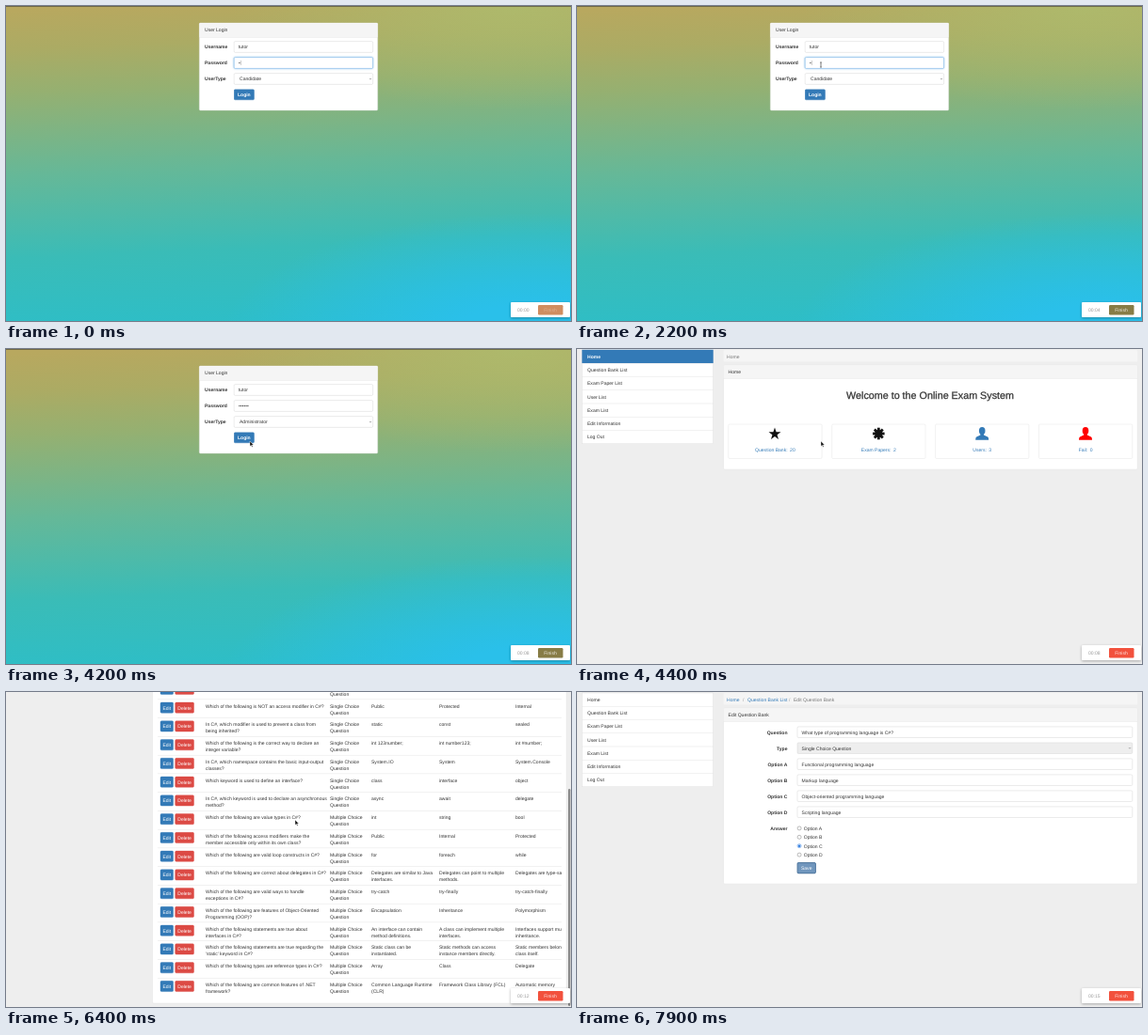
Animation of 600 by 335 pixels, one loop 8000 ms. Source, as an HTML page:

```html
<!DOCTYPE html>
<html lang="en">
<head>
<meta charset="utf-8">
<title>Online Exam System</title>
<style>
html, body { margin: 0; width: 100%; height: 100%; overflow: hidden; background: #eee; }
svg { display: block; width: 600px; height: 335px; }
text { font: 5.05px "Liberation Sans", Arial, sans-serif; fill: #333; text-rendering: geometricPrecision; white-space: pre; }
.b { font-weight: 700; }
.w { fill: #fff; }
.link { fill: #337ab7; }
.soft { fill: #777; }
.hint { fill: #999; }
.mid { text-anchor: middle; }
.end { text-anchor: end; }
.title { font-size: 10.75px; stroke: #333; stroke-width: .25; }
.drop { filter: drop-shadow(0 1px 1.5px rgba(0, 0, 0, .3)); }
.focus { fill: #fff; stroke: #7db8ea; stroke-width: .6; filter: drop-shadow(0 0 .8px rgba(102, 175, 233, .6)); }

.step { animation: 8s step-end infinite; }
#login { animation-name: login; }
#home { animation-name: home; }
#list { animation-name: list; }
#edit { animation-name: edit; }
#pwFocus, #caret { animation-name: pwFocus; }
#menu { animation-name: menu; }
#picked { animation-name: picked; }
#unpicked { animation-name: unpicked; }
#thumb { animation-name: thumb; }
#arrow { animation-name: arrow; }
#beam { animation-name: beam; }
#hand { animation-name: hand; }
#pressed { animation-name: pressed; }
#finish { animation-name: finish; }
#finishText { animation-name: finishText; }
#typed { animation: typed 8s linear infinite; }
#scroll { animation: scroll 8s ease-in-out infinite; }
#mouse { animation: mouse 8s ease-in-out infinite; }

@keyframes login { 0% { opacity: 1 } 53.75%, 100% { opacity: 0 } }
@keyframes home { 0% { opacity: 0 } 53.75% { opacity: 1 } 71.25%, 100% { opacity: 0 } }
@keyframes list { 0% { opacity: 0 } 71.25% { opacity: 1 } 90%, 100% { opacity: 0 } }
@keyframes edit { 0% { opacity: 0 } 90%, 100% { opacity: 1 } }
@keyframes pwFocus { 0% { opacity: 1 } 42.5%, 100% { opacity: 0 } }
@keyframes menu { 0% { opacity: 0 } 42.5% { opacity: 1 } 46.9%, 100% { opacity: 0 } }
@keyframes picked { 0% { opacity: 0 } 46.9%, 100% { opacity: 1 } }
@keyframes unpicked { 0% { opacity: 1 } 46.9%, 100% { opacity: 0 } }
@keyframes thumb { 0% { opacity: 0 } 75.5% { opacity: 1 } 87.5%, 100% { opacity: 0 } }
@keyframes beam { 0% { opacity: 0 } 25% { opacity: 1 } 30%, 100% { opacity: 0 } }
@keyframes arrow { 0% { opacity: 0 } 39% { opacity: 1 } 67.5% { opacity: 0 } 74% { opacity: 1 } 97%, 100% { opacity: 0 } }
@keyframes hand { 0% { opacity: 0 } 67.5% { opacity: 1 } 74%, 100% { opacity: 0 } }
@keyframes pressed { 0% { opacity: 0 } 96.25%, 100% { opacity: 1 } }
@keyframes finish { 0% { fill: #cf8d60 } 5% { fill: #877c46 } 53.75%, 100% { fill: #f2513d } }
@keyframes finishText { 0% { opacity: .3 } 5%, 100% { opacity: .85 } }
@keyframes typed {
  0% { transform: none }
  30% { transform: none; animation-timing-function: steps(5) }
  36.25%, 100% { transform: translateX(9px) }
}
@keyframes scroll {
  0%, 76% { transform: none }
  79.5%, 81.25% { transform: translateY(-148px) }
  85.6%, 100% { transform: none }
}
@keyframes mouse {
  0%, 39% { transform: translate(259px, 62.5px) }
  41.5%, 42.5% { transform: translate(260px, 77px) }
  44.5%, 46.9% { transform: translate(257px, 83px) }
  50.5%, 61% { transform: translate(259px, 98px) }
  68.5%, 73.1% { transform: translate(43px, 26px) }
  76%, 81.25% { transform: translate(307px, 136px) }
  86.5%, 90.6% { transform: translate(170px, 86px) }
  96.25%, 100% { transform: translate(243px, 187px) }
}
</style>
</head>
<body>
<svg viewBox="0 0 600 335">
  <defs>
    <linearGradient id="sky" gradientUnits="userSpaceOnUse" x1="292" y1="-8" x2="308" y2="343">
      <stop offset="0" stop-color="#b8a85f"/>
      <stop offset=".12" stop-color="#abab64"/>
      <stop offset=".25" stop-color="#95b071"/>
      <stop offset=".5" stop-color="#65b898"/>
      <stop offset=".75" stop-color="#3abcb7"/>
      <stop offset="1" stop-color="#2cbec9"/>
    </linearGradient>
    <radialGradient id="cyan" gradientUnits="userSpaceOnUse" cx="0" cy="0" r="1" gradientTransform="translate(560 350) scale(330 130)">
      <stop offset=".25" stop-color="#2ac0ea"/>
      <stop offset="1" stop-color="#2ac0ea" stop-opacity="0"/>
    </radialGradient>
    <radialGradient id="lime" gradientUnits="userSpaceOnUse" cx="0" cy="0" r="1" gradientTransform="translate(540 0) scale(300 110)">
      <stop offset="0" stop-color="#adbd6e" stop-opacity=".8"/>
      <stop offset="1" stop-color="#adbd6e" stop-opacity="0"/>
    </radialGradient>
    <clipPath id="table"><path d="M156 0H590V600H156z"/></clipPath>
  </defs>
  <g id="stage"></g>
  <g class="drop"><rect x="536" y="315" width="63" height="16" rx="1" fill="#fff"/></g>
  <text id="clock" class="hint" x="543" y="325.3">00:00</text>
  <rect id="finish" class="step" x="565" y="318" width="26.5" height="10.5" rx="1.2"/>
  <text id="finishText" class="step w mid" x="578" y="325.1">Finish</text>
  <g id="mouse">
    <path id="arrow" class="step" d="M0 0V5.4L1.3 4.3L2.2 6.3L3.1 5.9L2.2 4H3.9z" fill="#111" stroke="#fff" stroke-width=".4"/>
    <path id="beam" class="step" d="M-1 -2.6Q0 -2.6 0 -2Q0 -2.6 1 -2.6M0 -2V2M-1 2.6Q0 2.6 0 2Q0 2.6 1 2.6" fill="none" stroke="#222" stroke-width=".6"/>
    <path id="hand" class="step" d="M-.6 0Q0 -.7 .5 0V2L2.7 2.5V4.3L2 5.6H-.6L-2 3.4L-1.4 2.9L-.6 3.6z" fill="#fff" stroke="#111" stroke-width=".5"/>
  </g>
</svg>
<script>
const text = (x, y, s, cls = '') => `<text x="${x}" y="${y + 1.8}" class="${cls}">${s}</text>`;
const rect = (x, y, w, h, fill, more = '') => `<rect x="${x}" y="${y}" width="${w}" height="${h}" fill="${fill}" ${more}/>`;
const box = (x, y, w, h, fill = '#fff', line = '#ccc') => rect(x, y, w, h, fill, `rx="1.2" stroke="${line}" stroke-width=".4"`);
const rule = (x, y, w) => rect(x, y, w, .4, '#ddd');
const button = (x, y, w, h, s, fill, cls = 'w') =>
  box(x, y, w, h, fill, cls ? fill : '#ccc') + text(x + w / 2, y + h / 2, s, cls + ' mid');
const chevron = (x, y) => `<path d="M${x - 1} ${y - .5}l1 1l1 -1" fill="none" stroke="#555" stroke-width=".5"/>`;
const scene = (id, body) => `<g id="${id}" class="step">${body}</g>`;
const BLUE = '#337ab7', RED = '#dc4a44';

function loginScene() {
  const dots = Array.from({ length: 6 }, (_, i) => `<circle cx="${247.9 + 1.8 * i}" cy="60.5" r=".65" fill="#444"/>`).join('');
  return ['sky', 'lime', 'cyan'].map(id => rect(0, 0, 600, 335, `url(#${id})`)).join('') +
    rect(0, 0, 600, .8, '#5f5a40') +
    box(205.3, 18, 189.4, 93, '#fff', '#ddd') +
    rect(205.5, 18.2, 189, 14.8, '#f5f5f5') + rule(205.5, 33, 189) + text(211, 25.3, 'User Login') +
    ['Username', 'Password', 'UserType'].map((s, i) => text(211, 43.6 + 17 * i, s, 'b')).join('') +
    [37.6, 54.6, 71.6].map(y => box(242.2, y, 147.4, 11.8)).join('') +
    text(246.8, 43.6, 'tutor') +
    '<rect id="pwFocus" class="step focus" x="242.2" y="54.6" width="147.4" height="11.8" rx="1.2"/>' + dots +
    `<g id="typed">${rect(249, 57, 10, 7, '#fff')}${scene('caret', rect(249.1, 57.9, .3, 5, '#555'))}</g>` +
    scene('unpicked', text(248, 77.6, 'Candidate')) + scene('picked', text(248, 77.6, 'Administrator')) +
    chevron(387, 77.6) + button(242.2, 88.8, 21.3, 11, 'Login', BLUE, 'w b') +
    scene('menu',
      '<rect class="focus" x="242.2" y="71.6" width="147.4" height="11.8" rx="1.2"/>' +
      `<g class="drop">${rect(239, 64.5, 148, 27, '#dddcd9', 'rx="2.5"')}</g>` +
      rect(240.5, 74, 144.5, 8, '#4b9cf5', 'rx="1"') +
      '<path d="M243.3 78.2l1 1.4l1.8 -3.3" fill="none" stroke="#fff" stroke-width=".7"/>' +
      text(248, 70, '--Please select a user type--') + text(248, 78, 'Candidate', 'w') + text(248, 86, 'Administrator'));
}

const nav = ['Home', 'Question Bank List', 'Exam Paper List', 'User List', 'Exam List', 'Edit Information', 'Log Out'];
const sidebar = active => rect(5.5, .8, 139, 100, '#fff', 'stroke="#ddd" stroke-width=".4"') +
  nav.map((s, i) => {
    const y = .8 + 14.25 * i, on = i === active;
    return (on ? rect(5.3, y, 139.4, 14.25, BLUE) : rule(5.5, y, 139)) + text(11, y + 7.2, s, on ? 'w b' : '');
  }).join('');

// crumbs: [x, label] pairs, the last one is the current page
const frame = (crumbs, title, bottom) =>
  rect(155.6, 1, 439.6, 12.6, '#f5f5f5', 'rx="1.2"') +
  crumbs.map(([x, s], i) =>
    (i ? text(x - 5, 7.8, '/', 'hint') : '') + text(x, 7.8, s, i < crumbs.length - 1 ? 'link' : 'soft')).join('') +
  box(155.6, 17.3, 439.6, bottom - 17.3, '#fff', '#ddd') +
  rect(155.8, 17.5, 439.2, 13.6, '#f5f5f5') + rule(155.8, 31.2, 439.2) + text(160.6, 24.2, title);
const page = rect(0, 0, 600, 335, '#eee');

function icons() {
  const star = Array.from({ length: 10 }, (_, i) => {
    const a = i * Math.PI / 5, r = i % 2 ? 2.7 : 6.8;
    return `${210 + r * Math.sin(a)},${90.4 - r * Math.cos(a)}`;
  }).join(' ');
  const spokes = [0, 45, 90, 135].map(a => rect(-1.4, -6.3, 2.8, 12.6, '#111', `transform="rotate(${a})"`)).join('');
  const person = (x, fill) => `<g transform="translate(${x} 83)" fill="${fill}"><ellipse cy="4" rx="3.3" ry="4"/>` +
    '<path d="M-1.8 6H1.8V8.6L6 10.6Q7 11.2 7 13.8H-7Q-7 11.2 -6 10.6L-1.8 8.6z"/></g>';
  return `<polygon points="${star}" fill="#111"/><g transform="translate(320.3 90)">${spokes}<circle r="4" fill="#111"/></g>` +
    person(430.2, BLUE) + person(540, '#f00');
}

const homeScene = () => page + sidebar(0) + frame([[159, 'Home']], 'Home', 128) +
  `<text x="375" y="53.2" class="title mid">Welcome to the Online Exam System</text>` +
  [['Question Bank', 20], ['Exam Papers', 2], ['Users', 3], ['Fail', 0]].map(([s, n], i) =>
    box(160.8 + 109.9 * i, 80, 99.3, 36.5, '#fff', '#ddd') +
    text(210.4 + 109.9 * i, 107.5, `${s}:\u2002${n}`, 'link mid')).join('') + icons();

// question / option A / option B / option C, with ~ as a line break
const rows = `What type of programming language is C#?|Functional programming~language|Markup language|Object-oriented programming~language
In C#, which keyword is used to create an instance of an~object?|class|object|struct
Which of the following is the entry point of a C# program?|Main()|Public static void|Class
Which keyword is used for handling exceptions in C#?|try-catch|try-throw|try-catch-throw
Which of the following is NOT an access modifier in C#?|Public|Protected|Internal
In C#, which modifier is used to prevent a class from~being inherited?|static|const|sealed
Which of the following is the correct way to declare an~integer variable?|int 123number;|int number123;|int #number;
In C#, which namespace contains the basic input-output~classes?|System.IO|System|System.Console
Which keyword is used to define an interface?|class|interface|object
In C#, which keyword is used to declare an asynchronous~method?|async|await|delegate
Which of the following are value types in C#?|int|string|bool
Which of the following access modifiers make the~member accessible only within its own class?|Public|Internal|Protected
Which of the following are valid loop constructs in C#?|for|foreach|while
Which of the following are correct about delegates in C#?|Delegates are similar to Java~interfaces.|Delegates can point to multiple~methods.|Delegates are type-safe.
Which of the following are valid ways to handle~exceptions in C#?|try-catch|try-finally|try-catch-finally
Which of the following are features of Object-Oriented~Programming (OOP)?|Encapsulation|Inheritance|Polymorphism
Which of the following statements are true about~interfaces in C#?|An interface can contain~method definitions.|A class can implement multiple~interfaces.|Interfaces support multiple~inheritance.
Which of the following statements are true regarding the~'static' keyword in C#?|Static class can be~instantiated.|Static methods can access~instance members directly.|Static members belong to the~class itself.
Which of the following types are reference types in C#?|Array|Class|Delegate
Which of the following are common features of .NET~framework?|Common Language Runtime~(CLR)|Framework Class Library (FCL)|Automatic memory~management`.split('\n');
const cols = [212, 344, 388, 460, 541];

function tableRow(row, i) {
  const y = 83.7 + 19.75 * i, cells = row.split('|');
  cells.splice(1, 0, (i < 10 ? 'Single' : 'Multiple') + ' Choice~Question');
  return rule(161, y - 7, 429) +
    button(164, y - 3.6, 13.6, 11.2, 'Edit', BLUE) + button(179.7, y - 3.6, 19.8, 11.2, 'Delete', RED) +
    cells.map((c, k) => c.split('~').map((s, n) => text(cols[k], y + 7 * n, s)).join('')).join('');
}

const listScene = () => page + '<g id="scroll">' + sidebar(1) +
  frame([[159, 'Home'], [181, 'Question Bank List']], 'Question Bank List', 479) +
  text(166, 42.8, 'Question', 'b') + box(197.3, 37, 100.3, 11.6) + text(202, 42.8, 'Please enter the question', 'hint') +
  text(323, 42.8, 'Type', 'b') + box(343.4, 37, 99.8, 11.6) + text(349, 42.8, '-- Please select a question type--', 'soft') +
  chevron(440, 42.8) + button(453.6, 37, 24, 11.4, 'Search', BLUE) + button(480, 37, 28, 11.4, 'Add New', '#fff', '') +
  '<g clip-path="url(#table)">' +
  ['Question', 'Type', 'Option A', 'Option B', 'Option C'].map((s, i) => text(cols[i], 71, s, 'b')).join('') +
  rows.map(tableRow).join('') + '</g></g>' +
  scene('thumb', rect(597, 103, 2.4, 231, '#8b8b8b', 'rx="1.2"'));

function editScene() {
  const fields = [['Question', 'What type of programming language is C#?'], ['Type', 'Single Choice Question'],
    ['Option A', 'Functional programming language'], ['Option B', 'Markup language'],
    ['Option C', 'Object-oriented programming language'], ['Option D', 'Scripting language']];
  return page + sidebar(-1) +
    frame([[159, 'Home'], [181, 'Question Bank List'], [230, 'Edit Question Bank']], 'Edit Question Bank', 204) +
    fields.map(([s, v], i) => {
      const y = 42.7 + 17 * i;
      return text(223.5, y, s, 'b end') + box(234, y - 5.8, 355.8, 11.6, i === 1 ? '#eee' : '#fff') + text(238.6, y, v);
    }).join('') + chevron(587, 59.7) + text(223.5, 144.7, 'Answer', 'b end') +
    [...'ABCD'].map((c, i) => {
      const y = 144.9 + 9.4 * i, on = c === 'C';
      return `<circle cx="236.1" cy="${y}" r="2" fill="#fff" stroke="${on ? '#2f7de0' : '#777'}" stroke-width=".5"/>` +
        (on ? `<circle cx="236.1" cy="${y}" r="1.3" fill="#2f7de0"/>` : '') + text(240.8, y, 'Option ' + c);
    }).join('') +
    button(234, 181.6, 19.4, 11.2, 'Save', BLUE) +
    scene('pressed', box(234, 181.6, 19.4, 11.2, '#7096bd', '#2b4a6b') + text(243.7, 187.2, 'Save', 'w mid'));
}

document.getElementById('stage').innerHTML = scene('login', loginScene()) + scene('home', homeScene()) +
  scene('list', listScene()) + scene('edit', editScene());

const clock = document.getElementById('clock');
let start;
function tick(now) {
  start ??= now;
  const s = Math.floor((now - start) % 8000 / 500);
  clock.textContent = '00:' + String(s).padStart(2, '0');
  requestAnimationFrame(tick);
}
requestAnimationFrame(tick);
</script>
</body>
</html>
```
